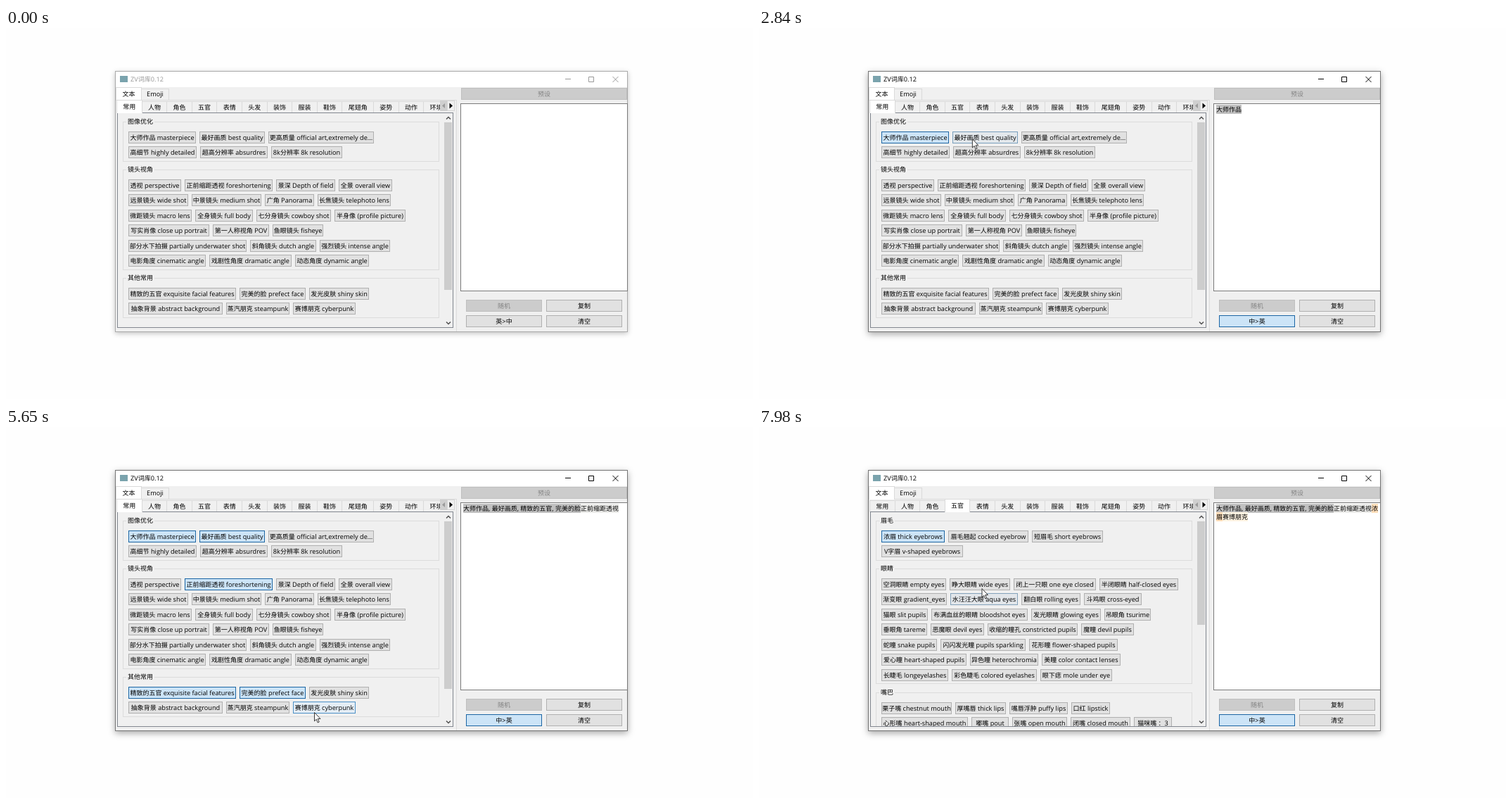
Animation of 1062 by 527 pixels, one loop 8 s. Source, as an HTML page:

```html
<!DOCTYPE html>
<html lang="zh">
<head>
<meta charset="utf-8">
<title>词库</title>
<style>
html, body { margin: 0; width: 100%; height: 100%; overflow: hidden; background: #fefefe; }
#stage { position: relative; width: 1062px; height: 527px; overflow: hidden; color: #000;
  font: 9.2px/12px "Open Sans", "Noto Sans CJK SC", "Noto Sans CJK", sans-serif;
  text-rendering: geometricPrecision; white-space: nowrap; cursor: default; }
#stage div { position: absolute; box-sizing: border-box; }
i { font-style: normal; font-size: 9px; }
svg { position: absolute; left: 0; top: 0; overflow: visible; }

.win { background: #f0f0f0; border: 1px solid #a9a9a9; box-shadow: 0 2px 7px rgba(0,0,0,.24); }
.active .win { border-color: #747474; box-shadow: 0 3px 9px rgba(0,0,0,.34); }
.bar { background: #fff; }
.title { color: #999; }
.ctl { stroke: #999; }
.active .title { color: #000; }
.active .ctl { stroke: #000; }
.icon { background: #7aa3ad; }

.tab { background: #f0f0f0; border: 1px solid #dadada; border-bottom: 0; text-align: center; }
.tab.sel { background: #fff; z-index: 1; }
.area { border: 1px solid #828790; }
.page { left: 0; top: 0; width: 1062px; height: 527px; clip-path: inset(122px 439px 102px 160px); }
.group { border: 1px solid #dcdcdc; }
.legend { background: #f0f0f0; padding: 0 2px; }

.btn { --h: 0; text-align: center; line-height: 15px; border: 1px solid;
  background: color-mix(in srgb, #e5f1fb calc(var(--h) * 100%), #e1e1e1);
  border-color: color-mix(in srgb, #0078d7 calc(var(--h) * 75%), #b0b0b0); }
.btn.on { background: #cce4f7; border-color: #1c66a4; }
.btn.off { background: #ccc; border-color: #bfbfbf; color: #838383; }

.edit { background: #fff; border: 1px solid #7a7a7a; }
#prompt { white-space: normal; }
#prompt b { font-weight: 400; background: #c0c0c0; }
#prompt u { text-decoration: none; background: #ececea; }
#prompt em { font-style: normal; background: #ffdfba; }
#prompt s { text-decoration: none; background: #fff4e3; }
#press { width: 20px; height: 20px; border-radius: 50%; background: rgba(255,240,20,.7); z-index: 3; }
#mouse { z-index: 4; }
</style>
</head>
<body>
<div id="stage"></div>
<script>
const LOOP = 8000;
const stage = document.getElementById('stage');
const buttons = {};

const rich = s => s.replace(/[\u3000-\u9fff\uff00-\uffef]+/g, '<i>$&</i>');

function add(cls, x, y, w, h, text = '', parent = stage) {
  const el = document.createElement('div');
  el.className = cls;
  el.style.cssText = `left:${x}px;top:${y}px;` + (w ? `width:${w}px;height:${h}px;` : '');
  el.innerHTML = rich(text);
  return parent.appendChild(el);
}

function addSvg(body, cls = '') {
  stage.insertAdjacentHTML('beforeend',
    `<svg class="${cls}" width="1062" height="527" fill="none">${body}</svg>`);
  return stage.lastElementChild;
}

function addButton(label, x, y, w, parent, cls = '') {
  const el = add('btn ' + cls, x, y, w, 17, label, parent);
  buttons[label.split(' ')[0]] = el;
  return el;
}

// Each row holds "label width" entries; groups stack downwards.
function addPage(groups) {
  const page = add('page', 0, 0, 1062, 527);
  let y = 133;
  for (const [name, ...rows] of groups) {
    const h = 14 + 21.5 * rows.length;
    add('group', 166, y, 450, Math.floor(h), '', page);
    add('legend', 171, y - 6, 0, 0, name, page);
    rows.forEach((row, r) => {
      let x = 174;
      for (const item of row.split('; ')) {
        const [, label, w] = item.match(/(.*) (\d+)$/);
        addButton(label, x, Math.floor(y + 14 + 21.5 * r), +w, page);
        x += +w + 5;
      }
    });
    y = Math.round(y + h) + 11;
  }
  return page;
}

// Window frame
add('win', 155, 61, 729, 371);
add('bar', 156, 62, 727, 22);
add('icon', 162, 68, 11, 9);
add('title', 177, 67, 0, 0, 'ZV词库0.12');
addSvg('<path d="M795 72.5h8M828.5 69.5h7v7h-7zM862.5 69l8 8M870.5 69l-8 8"/>', 'ctl');

// Outer and inner tabs
const addTab = (label, x, w, y, h) => {
  const el = add('tab', x, y, w, h, label);
  el.style.lineHeight = h - 2 + 'px';
  return el;
};
addTab('文本', 156, 37, 84, 19).classList.add('sel');
addTab('Emoji', 192, 40, 86, 16);
add('', 640, 102, 1, 329).style.background = '#dcdcdc';
add('', 156, 102, 485, 1).style.background = '#dcdcdc';

const names = '常用 人物 角色 五官 表情 头发 装饰 服装 鞋饰 尾翅角 姿势 动作 环境'.split(' ');
const strip = add('', 156, 102, 461, 19);
strip.style.overflow = 'hidden';
let tabX = 1;
const tabs = names.map(name => {
  const w = name.length > 2 ? 44.6 : 35.6;
  const el = add('tab', tabX, 2, w + 1, 17, name, strip);
  tabX += w;
  return el;
});
add('', 617, 103, 10, 15).style.background = '#cfcfcf';
add('', 627, 103, 11, 15).style.cssText += 'background:#f0f0f0;border:1px solid #d5d5d5';
addSvg('<path fill="#9a9a9a" d="M624 107v7l-4-3.500z"/><path fill="#000" d="M630.500 106.500v8l4.500-4z"/>');

// Scroll area
add('area', 158, 120, 478, 306);
const thumb = add('', 623, 134, 11, 238);
thumb.style.background = '#cdcdcd';
addSvg('<path stroke="#505050" stroke-width="1.500" d="M626 129.500l3-3 3 3M626 417.500l3 3 3-3"/>');

const pages = [
  addPage([
    ['图像优化',
      '大师作品 masterpiece 96; 最好画质 best quality 93; 更高质量 official art,extremely de... 150',
      '高细节 highly detailed 97; 超高分辨率 absurdres 96; 8k分辨率 8k resolution 101'],
    ['镜头视角',
      '透视 perspective 75; 正前缩距透视 foreshortening 125; 景深 Depth of field 84; 全景 overall view 76',
      '远景镜头 wide shot 85; 中景镜头 medium shot 99; 广角 Panorama 70; 长焦镜头 telephoto lens 104',
      '微距镜头 macro lens 90; 全身镜头 full body 82; 七分身镜头 cowboy shot 106; 半身像 (profile picture) 101',
      '写实肖像 close up portrait 115; 第一人称视角 POV 80; 鱼眼镜头 fisheye 72',
      '部分水下拍摄 partially underwater shot 168; 斜角镜头 dutch angle 94; 强烈镜头 intense angle 100',
      '电影角度 cinematic angle 110; 戏剧性角度 dramatic angle 117; 动态角度 dynamic angle 105'],
    ['其他常用',
      '精致的五官 exquisite facial features 153; 完美的脸 prefect face 94; 发光皮肤 shiny skin 85',
      '抽象背景 abstract background 134; 蒸汽朋克 steampunk 90; 赛博朋克 cyberpunk 89']
  ]),
  addPage([
    ['眉毛',
      '浓眉 thick eyebrows 90; 眉毛翘起 cocked eyebrow 114; 短眉毛 short eyebrows 101',
      'V字眉 v-shaped eyebrows 116'],
    ['眼睛',
      '空洞眼睛 empty eyes 92; 睁大眼睛 wide eyes 86; 闭上一只眼 one eye closed 117; 半闭眼睛 half-closed eyes 112',
      '渐变眼 gradient_eyes 93; 水汪汪大眼 aqua eyes 96; 翻白眼 rolling eyes 84; 斗鸡眼 cross-eyed 82',
      '猫眼 slit pupils 66; 布满血丝的眼睛 bloodshot eyes 137; 发光眼睛 glowing eyes 99; 吊眼角 tsurime 66',
      '垂眼角 tareme 65; 恶魔眼 devil eyes 76; 收缩的瞳孔 constricted pupils 128; 魔瞳 devil pupils 75',
      '蛇瞳 snake pupils 79; 闪闪发光瞳 pupils sparkling 121; 花形瞳 flower-shaped pupils 126',
      '爱心瞳 heart-shaped pupils 121; 异色瞳 heterochromia 97; 美瞳 color contact lenses 112',
      '长睫毛 longeyelashes 95; 彩色睫毛 colored eyelashes 121; 眼下痣 mole under eye 102'],
    ['嘴巴',
      '栗子嘴 chestnut mouth 100; 厚嘴唇 thick lips 72; 嘴唇浮肿 puffy lips 83; 口红 lipstick 55',
      '心形嘴 heart-shaped mouth 123; 嘟嘴 pout 53; 张嘴 open mouth 78; 闭嘴 closed mouth 85; 猫咪嘴 ：3 54']
  ])
];

// Right-hand side
addButton('预设', 647, 85, 236, stage, 'off');
add('edit', 646, 107, 238, 267);
const prompt = add('', 650, 110, 232, 40);
prompt.id = 'prompt';
addButton('随机', 654, 386, 108, stage, 'off');
addButton('复制', 768, 386, 108);
const swap = addButton('英>中', 654, 408, 108);
addButton('清空', 768, 408, 108);

const press = add('', 0, 0);
press.id = 'press';
const mouse = addSvg('<path fill="#fff" stroke="#222" stroke-width=".9" ' +
  'd="M.500 .500V12.800L3.300 10.200 5.200 14.900 7.200 14 5.200 9.500H9z"/>');
mouse.id = 'mouse';

// Timeline: pointer stops, button presses, hover spans, toggles, prompt text
const path = [
  [30, 732, 39], [560, 656, 394], [730, 656, 394], [1010, 709, 415],
  [1690, 709, 415], [2150, 262, 163], [2420, 240, 158],
  [2690, 240, 158], [2910, 322, 157], [3340, 322, 157], [3600, 331, 229],
  [3700, 331, 229], [3800, 333, 226], [4080, 333, 226], [4540, 282, 377],
  [4930, 282, 377], [5220, 352, 382], [5500, 352, 382], [5650, 438, 405],
  [6230, 438, 405], [6740, 282, 112], [7040, 282, 112], [7350, 232, 157],
  [7760, 232, 157], [8060, 334, 244]
];
const presses = [[1210, 1340], [2520, 2620], [3110, 3210], [3830, 3915], [4710, 4785],
  [5300, 5390], [5900, 6000], [6800, 6920], [7430, 7530]];
const hovers = [
  ['英>中', 850, 1400], ['超高分辨率', 2010, 2150], ['大师作品', 2200, 2700],
  ['最好画质', 2790, 3300], ['正前缩距透视', 3560, 4000], ['精致的五官', 4400, 4900],
  ['完美的脸', 5120, 5500], ['赛博朋克', 5560, 6200], ['浓眉', 7260, 7600],
  ['水汪汪大眼', 7940, LOOP]
];
const toggles = [
  ['英>中', 1210, LOOP], ['大师作品', 2540, LOOP], ['最好画质', 3130, LOOP],
  ['正前缩距透视', 3860, LOOP], ['精致的五官', 4730, LOOP], ['完美的脸', 5320, LOOP],
  ['赛博朋克', 5920, LOOP], ['浓眉', 7450, LOOP],
  ['眉毛翘起', 0, 7540], ['水汪汪大眼', 0, 7540]
];
const lead = ['大师作品', '最好画质', '精致的五官', '完美的脸'];
const view = '<u>正前缩距透视</u>', punk = '<s>赛博朋克</s>';
const texts = [
  [0, 0, ''], [2630, 1, ''], [3220, 2, ''], [3920, 2, view], [4790, 3, view], [5400, 4, view],
  [6010, 4, view + punk], [7540, 4, view + '<em>浓眉</em>' + punk]
];

const clamp = v => Math.max(0, Math.min(1, v));
const within = (t, a, b) => t >= a && t < b;

function pointer(t) {
  const i = Math.max(1, path.findIndex(p => p[0] > t));
  const [t0, x0, y0] = path[i - 1], [t1, x1, y1] = path[i];
  const u = clamp((t - t0) / (t1 - t0)), s = u * u * (3 - 2 * u);
  return [x0 + (x1 - x0) * s, y0 + (y1 - y0) * s];
}

let shown = '';
function setPrompt(t) {
  const [, n, tail] = texts.filter(e => e[0] <= t).pop();
  const html = `<b>${rich(lead.slice(0, n).join(', '))}</b>${rich(tail)}`;
  if (html !== shown) prompt.innerHTML = shown = html;
}

function render(t) {
  stage.classList.toggle('active', t >= 1210);
  swap.innerHTML = rich(t < 1340 ? '英&gt;中' : '中&gt;英');

  const second = t >= 6820;
  pages[0].style.visibility = second ? 'hidden' : 'visible';
  pages[1].style.visibility = second ? 'visible' : 'hidden';
  thumb.style.height = (second ? 147 : 238) + 'px';
  tabs.forEach((tab, i) => {
    const sel = i === (second ? 3 : 0);
    tab.classList.toggle('sel', sel);
    tab.style.top = (sel ? 0 : 2) + 'px';
    tab.style.height = (sel ? 19 : 17) + 'px';
    tab.style.lineHeight = (sel ? 17 : 15) + 'px';
  });

  for (const [name, a, b] of hovers)
    buttons[name].style.setProperty('--h', clamp((t - a) / 120) * clamp(1 - (t - b) / 120));
  for (const [name, a, b] of toggles)
    buttons[name].classList.toggle('on', within(t, a, b));
  setPrompt(t);

  const [x, y] = pointer(t);
  mouse.style.transform = `translate(${x}px,${y}px)`;
  mouse.style.visibility = t < 30 ? 'hidden' : 'visible';
  press.style.transform = `translate(${x - 10}px,${y - 10}px)`;
  press.style.visibility = presses.some(p => within(t, ...p)) ? 'visible' : 'hidden';
}

const start = performance.now();
function tick(now) {
  render(Math.max(0, now - start) % LOOP);
  requestAnimationFrame(tick);
}
render(0);
requestAnimationFrame(tick);
</script>
</body>
</html>
```
